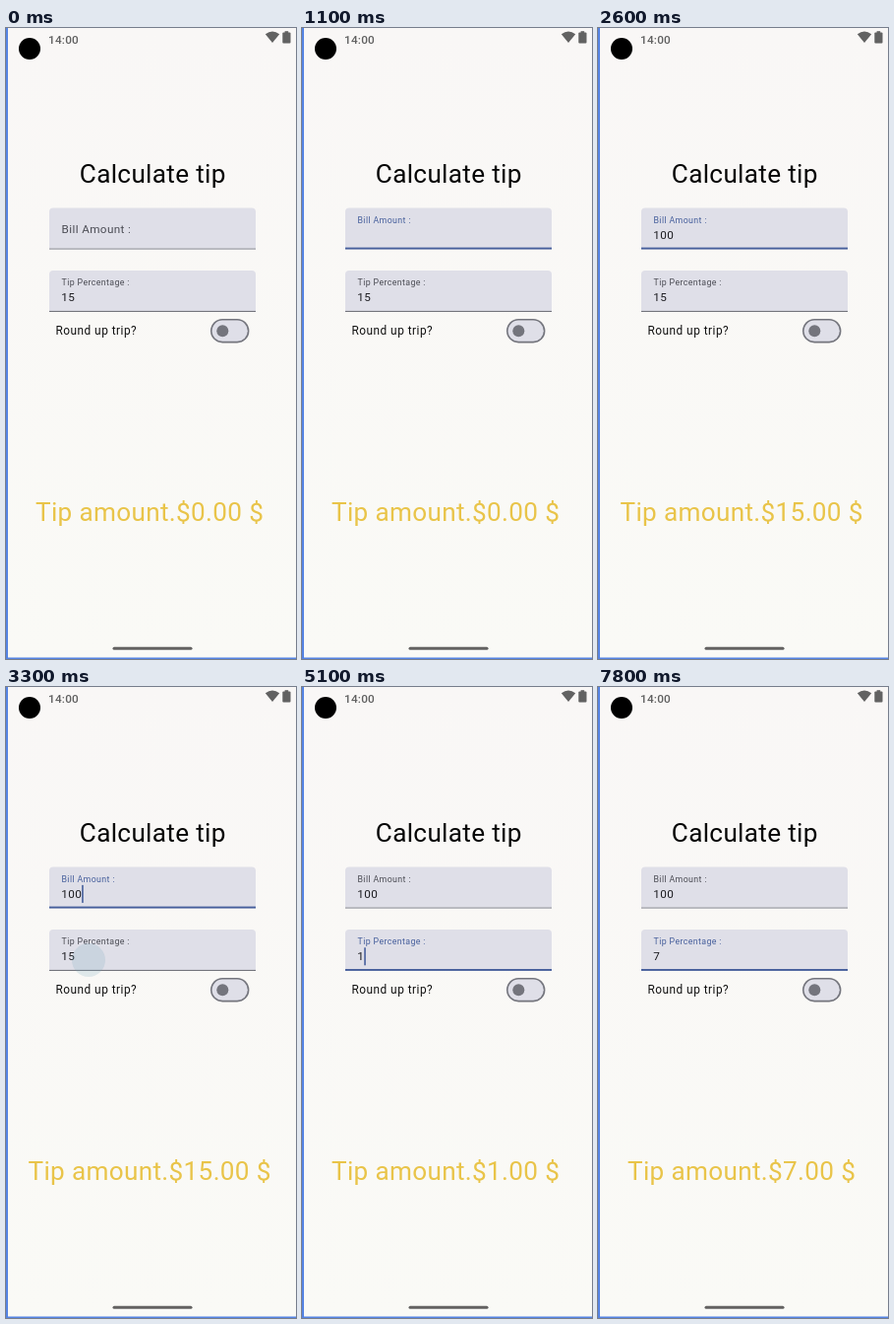
Write an HTML page with a canvas that moves like this. It is 295x640 px and loops after 8 s.

```html
<!DOCTYPE html>
<html lang="en">
<head>
<meta charset="utf-8">
<title>Calculate tip</title>
<style>
html, body { margin: 0; width: 100%; height: 100%; overflow: hidden; background: #f9f8f6; }
canvas { display: block; width: 295px; height: 640px; }
</style>
</head>
<body>
<canvas id="stage"></canvas>
<script>
const W = 295, H = 640, LOOP = 8000;
const INK = '#1d1d21', GREY = '#4b4c54', BLUE = '#465f9c', GOLD = '#e9c449', FRAME = '#5584e4';
const canvas = document.getElementById('stage');
const ctx = canvas.getContext('2d');
const ratio = window.devicePixelRatio || 1;
canvas.width = W * ratio;
canvas.height = H * ratio;

// Each track lists [start time, value]; the latest started value holds.
const billTrack = [[0, ''], [1700, '1'], [1900, '10'], [2000, '100']];
const percentTrack = [[0, '15'], [5100, '1'], [5200, ''], [6100, '7']];
const focusTrack = [[0, ''], [600, 'bill'], [3700, 'percent']];
const caretTrack = [
  [0, false], [600, true], [1100, false], [1700, true], [2600, false], [3100, true],
  [4000, false], [4500, true], [5000, false], [5100, true], [5800, false],
  [6100, true], [6700, false], [7200, true], [7800, false]
];
const touches = [
  { x: 98, y: 193, from: 100, to: 500 },
  { x: 84, y: 277, from: 3300, to: 3600 }
];

function valueAt(track, t) {
  let value = track[0][1];
  for (const [start, next] of track) if (t >= start) value = next;
  return value;
}

const clamp = v => Math.max(0, Math.min(1, v));
const mix = (a, b, k) => a + (b - a) * k;
const ease = k => k * k * (3 - 2 * k);

function text(str, x, y, size, color, { spacing = 0.36, align = 'left', weight = 400 } = {}) {
  ctx.font = `${weight} ${size}px Roboto, sans-serif`;
  ctx.letterSpacing = spacing + 'px';
  ctx.textAlign = align;
  ctx.fillStyle = color;
  ctx.fillText(str, x, y);
}

function rect(x, y, w, h, color) {
  ctx.fillStyle = color;
  ctx.fillRect(x, y, w, h);
}

function round(x, y, w, h, r, color) {
  ctx.beginPath();
  ctx.roundRect(x, y, w, h, r);
  ctx.fillStyle = color;
  ctx.fill();
}

function disc(x, y, r, color) {
  ctx.beginPath();
  ctx.arc(x, y, r, 0, Math.PI * 2);
  ctx.fillStyle = color;
  ctx.fill();
}

function statusBar() {
  disc(24, 21, 11, '#000');
  text('14:00', 43, 16, 11.8, '#606060', { spacing: 0.2, weight: 500 });
  ctx.fillStyle = '#626262';
  ctx.beginPath();
  ctx.moveTo(271, 15);
  ctx.lineTo(263.8, 6.2);
  ctx.quadraticCurveTo(271, 0.8, 278.2, 6.2);
  ctx.closePath();
  ctx.fill();
  round(281.3, 4.6, 8.2, 11, 1, '#626262');
  rect(283.6, 3.2, 3.6, 2, '#626262');
}

function field(y, label, value, focused, lift, caret, line) {
  const active = focused && lift > 0.5;
  round(44, y, 210, 42, [4, 4, 0, 0], '#dfdfe8');
  if (active) rect(44, y + 40, 210, 1.9, BLUE);
  else rect(44, y + 40.9, 210, 1.1, line);

  const size = mix(11.73, 8.8, lift);
  text(label, 56.5, y + mix(25, 15.2, lift), size, active ? BLUE : GREY, { spacing: 0.38 });
  text(value, 56.3, y + 31, 11.73, INK);
  if (focused && caret) {
    const x = 56.3 + (value ? ctx.measureText(value).width : 0);
    rect(x, y + mix(22.6, 18.3, lift), 1.6, 18, BLUE);
  }
}

function toggle() {
  round(208, 295, 39.4, 24.4, 12.2, '#74757d');
  round(209.6, 296.6, 36.2, 21.2, 10.6, '#dfdfe8');
  disc(220.3, 307.2, 6, '#74757d');
}

function handle() {
  ctx.beginPath();
  ctx.moveTo(71.3, 282);
  ctx.lineTo(77, 287.6);
  ctx.arc(71.3, 292.7, 7.7, -0.73, Math.PI + 0.73);
  ctx.closePath();
  ctx.fillStyle = '#425a98';
  ctx.fill();
}

function touch({ x, y, from, to }, t) {
  if (t < from || t >= to) return;
  const alpha = 0.2 * clamp((to - t) / 150);
  disc(x, y, 17, `rgba(115, 165, 185, ${alpha})`);
}

function draw(t) {
  const bill = valueAt(billTrack, t);
  const percent = valueAt(percentTrack, t);
  const focus = valueAt(focusTrack, t);
  const caret = valueAt(caretTrack, t);
  const lift = ease(clamp((t - 750) / 150));
  const tip = (Number(bill) * Number(percent) / 100).toFixed(2);

  ctx.setTransform(ratio, 0, 0, ratio, 0, 0);
  const back = ctx.createLinearGradient(0, 0, 0, H);
  back.addColorStop(0, '#f9f7f6');
  back.addColorStop(1, '#fafaf6');
  rect(0, 0, W, H, back);
  rect(0, 0, 2, H, FRAME);
  rect(0, 638.5, W, 1.5, FRAME);
  statusBar();

  text('Calculate tip', 149.3, 156.8, 26.15, '#050505', { align: 'center', spacing: 0.33 });
  field(182.6, 'Bill Amount :', bill, focus === 'bill', lift, caret, '#96979d');
  field(246, 'Tip Percentage :', percent, focus === 'percent', 1, caret, '#74757d');
  text('Round up trip?', 50.5, 311.4, 11.85, '#111', { spacing: 0.48 });
  toggle();
  if (t >= 3700 && t < 5100) handle();
  text(`Tip amount.$${tip} $`, 146.1, 500, 26.15, GOLD, { align: 'center', spacing: 0.33 });
  touches.forEach(p => touch(p, t));
  round(108.5, 627.7, 81, 3, 1.5, '#636261');
}

function tick() {
  draw(performance.now() % LOOP);
  requestAnimationFrame(tick);
}
tick();
</script>
</body>
</html>
```
